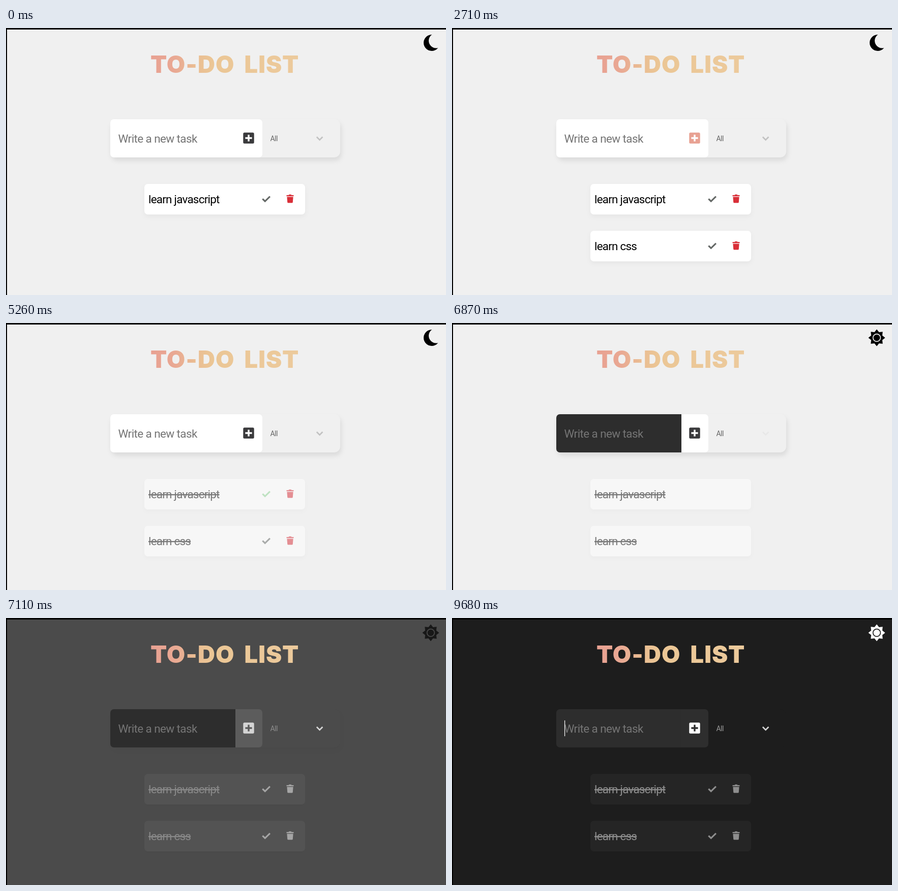
Recreate the animation shown at these times as an HTML page. Size 865 by 524 pixels, loop 9930 ms.

```html
<!DOCTYPE html>
<html lang="en">
<head>
<meta charset="utf-8">
<title>To-do list</title>
<style>
  html, body { margin: 0; width: 100%; height: 100%; overflow: hidden; background: #000; }
  svg { display: block; width: 865px; height: 524px; }
  text { font-family: Roboto, "Open Sans", sans-serif; white-space: pre; }
  .title { font: 900 47px Inter, "Open Sans", sans-serif; letter-spacing: .025em; fill: url(#warm); }
  .field { font-size: 22.5px; letter-spacing: -.027em; }
  .label { font-size: 22.5px; letter-spacing: -.035em; }
  .done .label { text-decoration: line-through; text-decoration-thickness: 1.6px; }
  .filter { font-size: 14px; letter-spacing: -.04em; }
  .bar { filter: drop-shadow(2px 6px 5px rgba(0, 0, 0, calc(.09 * var(--shade)))); }
  .card { filter: drop-shadow(0 4px 5px rgba(0, 0, 0, calc(.045 * var(--shade)))); }
</style>
</head>
<body>
<svg id="stage" viewBox="0 0 865 524">
  <defs>
    <linearGradient id="warm" gradientUnits="userSpaceOnUse" x1="285" x2="575" y1="0" y2="0">
      <stop offset="0" stop-color="#e8a192"/>
      <stop offset=".16" stop-color="#e9a893"/>
      <stop offset=".3" stop-color="#eabd92"/>
      <stop offset=".42" stop-color="#ebc695"/>
      <stop offset="1" stop-color="#ecca9c"/>
    </linearGradient>
    <clipPath id="round"><rect x="205" y="179" width="299" height="75" rx="7"/></clipPath>
    <g id="task">
      <rect class="card" x="272" y="306" width="316" height="60" rx="7"/>
      <text class="label" x="280" y="344"></text>
      <path class="check" d="M504.3 335.3l4.9 4.7 9.7-9.4" fill="none" stroke-width="3.1"/>
      <path class="trash" d="M551.5 328h4l1-1.2h4l1 1.2h4v2.3h-14zM552.4 331.4h12.2l-.8 10.4q-.1 1.5-1.6 1.5h-7.4q-1.5 0-1.6-1.5z"/>
    </g>
  </defs>
  <rect id="page" x="2" y="3" width="863" height="521"/>
  <text class="title" y="88"><tspan x="284">TO-DO</tspan><tspan x="468.5">LIST</tspan></text>

  <path id="moon" d="M837.5 13A16 16 0 1 0 849.5 39A14.5 14.5 0 0 1 837.5 13z"/>
  <g id="sun">
    <polygon id="rays"/>
    <circle id="gap" cx="835" cy="29" r="8.2"/>
    <circle cx="835" cy="29" r="6.5"/>
  </g>

  <rect id="bar" class="bar" x="205" y="179" width="452" height="75" rx="12"/>
  <g clip-path="url(#round)">
    <rect id="input" x="205" y="179" width="247" height="75"/>
    <rect id="button" x="451" y="179" width="53" height="75"/>
  </g>
  <text id="hint" class="field" x="220.5" y="225" fill="#757575">Write a new task</text>
  <text id="typed" class="field" x="220.5" y="225"></text>
  <rect id="caret" y="201" width="1.2" height="31"/>
  <rect id="plus" x="466.3" y="205.3" width="21.4" height="21.4" rx="2.5"/>
  <path id="cross" d="M470.4 216h13.2M477 209.4v13.2" stroke-width="3.4"/>
  <text id="filter" class="filter" x="519.5" y="222">All</text>
  <path id="chevron" d="M610.8 213.8l5.8 5.8 5.8-5.8" fill="none" stroke-width="2.7"/>
  <g id="tasks"></g>
</svg>
<script>
const LOOP = 9930, STEP = 120;
const $ = id => document.getElementById(id);
const clamp = v => Math.min(1, Math.max(0, v));

// [time, typed text, caret shown]
const TYPING = [
  [0, '', 0], [620, '', 1], [1120, '', 0], [1240, 'le', 1], [1360, 'lear', 1],
  [1480, 'learn', 1], [1980, 'learn', 0], [2100, 'learn cs', 1], [2350, 'learn css', 1],
  [2590, '', 0], [8680, '', 1], [9180, '', 0], [9680, '', 1]
];
// Moments where each run of steps begins
const RUNS = [0, 2350, 3080, 3810, 4660, 6750];
const SUN = [[6990, 0], [7110, 24], [7230, 54], [7470, 128], [7830, 216], [8310, 255]];
const DARK_AT = 6870;

// CSS "ease" curve, solved by bisection
function ease(p) {
  p = clamp(p);
  if (p === 0 || p === 1) return p;
  let lo = 0, hi = 1, u = .5;
  for (let i = 0; i < 20; i++) {
    u = (lo + hi) / 2;
    const x = .75 * u * (1 - u) + u ** 3;
    if (x < p) lo = u; else hi = u;
  }
  return .3 * u * (1 - u) ** 2 + 3 * u * u * (1 - u) + u ** 3;
}

function mix(a, b, p) {
  const part = (hex, i) => parseInt(hex.slice(1 + 2 * i, 3 + 2 * i), 16);
  return 'rgb(' + [0, 1, 2].map(i =>
    Math.round(part(a, i) + (part(b, i) - part(a, i)) * p)) + ')';
}

function along(keys, t) {
  if (t <= keys[0][0]) return keys[0][1];
  for (let i = 1; i < keys.length; i++) {
    const [t0, v0] = keys[i - 1], [t1, v1] = keys[i];
    if (t < t1) return v0 + (v1 - v0) * (t - t0) / (t1 - t0);
  }
  return keys[keys.length - 1][1];
}

function snap(t) {
  const start = RUNS.filter(r => r <= t).pop();
  return start + Math.floor((t - start) / STEP) * STEP;
}

const fade = (t, start, length = 500) => ease((t - start) / length);
const fill = (el, color) => el.setAttribute('fill', color);
const line = (el, color) => el.setAttribute('stroke', color);
const show = (el, on) => { el.style.display = on ? '' : 'none'; };

$('rays').setAttribute('points', Array.from({ length: 16 }, (_, i) => {
  const a = i * Math.PI / 8, r = i % 2 ? 11.8 : 16.5;
  return (835 + r * Math.sin(a)).toFixed(2) + ',' + (29 - r * Math.cos(a)).toFixed(2);
}).join(' '));

function addTask(label, dy, born, done) {
  const el = $('task').cloneNode(true);
  el.removeAttribute('id');
  el.setAttribute('transform', `translate(0 ${dy})`);
  const find = name => el.querySelector('.' + name);
  find('label').textContent = label;
  $('tasks').append(el);
  return { el, born, done, card: find('card'), label: find('label'),
           check: find('check'), trash: find('trash') };
}
const tasks = [addTask('learn javascript', 0, 0, 3810), addTask('learn css', 92, 2590, 4660)];

// Pointer visits over each check mark: [enter, leave]
const VISITS = [[[3200, 4050], [4900, 6750]], [[4050, 4900]]];

function hover(t, visits) {
  return visits.reduce((sum, [a, b]) => sum + fade(t, a, 300) - fade(t, b, 300), 0);
}

function render(now) {
  const real = now % LOOP, t = snap(real);
  const dark = t >= DARK_AT, p = fade(t, DARK_AT);
  const page = mix('#f0f0f0', '#1d1d1d', p);
  const panel = mix('#ffffff', '#2e2e2e', p);

  $('stage').style.setProperty('--shade', 1 - p);
  fill($('page'), page);
  fill($('bar'), page);
  fill($('gap'), page);
  fill($('input'), dark ? '#2d2d2d' : '#ffffff');
  fill($('button'), panel);
  line($('cross'), panel);
  const lit = fade(t, 2350, 300) - fade(t, 3080);
  fill($('plus'), dark ? mix('#3a3a3c', '#ffffff', p) : mix('#3a3a3c', '#e8a192', lit));
  fill($('filter'), mix('#666666', '#999999', p));
  line($('chevron'), dark ? mix('#e8e8e8', '#d4d4d4', p) : '#c1c1c1');

  show($('moon'), !dark);
  show($('sun'), dark);
  const glow = Math.round(along(SUN, t));
  for (const c of [$('rays'), $('sun').lastElementChild]) fill(c, `rgb(${glow},${glow},${glow})`);

  const [, typed, caret] = TYPING.filter(k => k[0] <= real).pop();
  const text = $('typed');
  if (text.textContent !== typed) text.textContent = typed;
  show($('hint'), !typed);
  show($('caret'), caret);
  fill($('caret'), dark ? '#ffffff' : '#000000');
  $('caret').setAttribute('x', 221 + (typed ? text.getComputedTextLength() : 0));

  tasks.forEach((task, i) => {
    show(task.el, t >= task.born);
    task.el.setAttribute('class', t >= task.done ? 'done' : '');
    task.el.style.opacity = 1 - .5 * fade(t, task.done);
    fill(task.card, panel);
    fill(task.label, mix('#000000', '#ffffff', p));
    line(task.check, dark ? '#ffffff' : mix('#646866', '#8fd696', hover(t, VISITS[i])));
    fill(task.trash, dark ? '#ffffff' : '#d92f38');
  });
}

const origin = performance.now();
function tick() {
  render(performance.now() - origin);
  requestAnimationFrame(tick);
}
tick();
</script>
</body>
</html>
```
